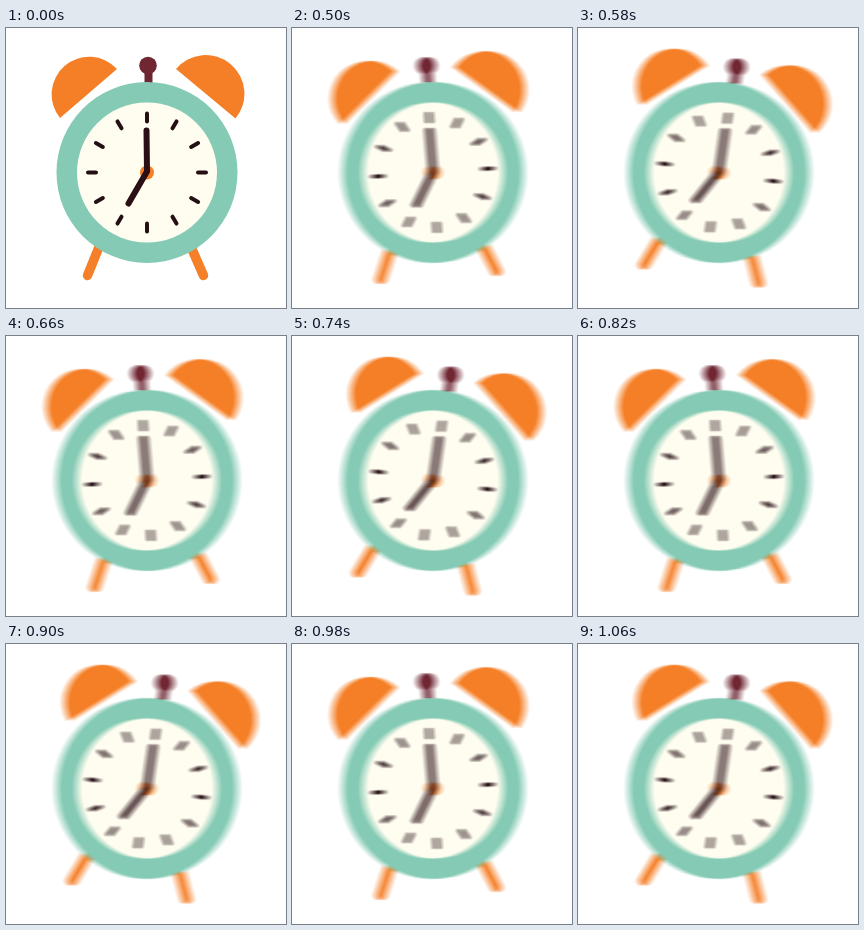
Animation, 280 px wide and 280 px high, one loop 1.14 s. Source, as an HTML page:

```html
<!DOCTYPE html>
<html lang="en">
<head>
<meta charset="utf-8">
<title>Ringing alarm clock</title>
<style>
  html, body { margin: 0; width: 100%; height: 100%; overflow: hidden; background: #fff; }
  svg { display: block; width: 100%; height: 100%; }

  .still, .ringing, .tilt { animation: 1140ms step-end infinite; }
  .still { animation-name: still; }
  .ringing { animation-name: ringing; }
  .tilt { animation-name: tilt; transform-origin: 141px 144.5px; }

  /* 500 ms at rest, then eight swings of 80 ms */
  @keyframes still { 0% { opacity: 1; } 43.859%, 100% { opacity: 0; } }
  @keyframes ringing { 0% { opacity: 0; } 43.859%, 100% { opacity: 1; } }
  @keyframes tilt {
    0%, 57.894%, 71.929%, 85.964% { transform: rotate(-4deg); }
    50.877%, 64.912%, 78.947%, 92.982%, 100% { transform: rotate(9deg); }
  }
</style>
</head>
<body>
<svg viewBox="0 0 280 280">
  <defs>
    <!-- sideways motion blur -->
    <filter id="smear" filterUnits="userSpaceOnUse" x="0" y="0" width="280" height="280"
            color-interpolation-filters="sRGB">
      <feConvolveMatrix order="11 1" kernelMatrix="1 1 1 1 1 1 1 1 1 1 1" divisor="11"
                        edgeMode="none" preserveAlpha="false"/>
    </filter>

    <path id="tick" d="M141 85.5V93.5"/>
    <g id="tickPair">
      <use href="#tick"/>
      <use href="#tick" transform="rotate(180 141 144.5)"/>
    </g>
    <g id="tickCross">
      <use href="#tickPair"/>
      <use href="#tickPair" transform="rotate(90 141 144.5)"/>
    </g>

    <g id="clock" stroke-linecap="round" stroke-linejoin="round">
      <g stroke="#f58029" stroke-width="9.5">
        <path d="M93 219L81.5 247.5"/>
        <path d="M185 219L197.5 247.5"/>
      </g>
      <g fill="#f57f26">
        <path d="M54 90A37.6 37.6 0 0 1 111 41Z"/>
        <path d="M170 41A38 38 0 0 1 229.5 90.5Z"/>
      </g>
      <path d="M142.5 40V58" stroke="#6c2633" stroke-width="8" stroke-linecap="butt"/>
      <circle cx="142" cy="37.5" r="8.8" fill="#702633"/>
      <circle cx="141" cy="144.5" r="90.5" fill="#84cab4"/>
      <circle cx="141" cy="144.5" r="70" fill="#fffdf0"/>
      <g stroke="#240f14" stroke-width="4">
        <use href="#tickCross"/>
        <use href="#tickCross" transform="rotate(30 141 144.5)"/>
        <use href="#tickCross" transform="rotate(60 141 144.5)"/>
      </g>
      <circle cx="141" cy="144.5" r="7" fill="#f57f26"/>
      <path d="M140.5 102.5L141 143.5L122.5 175.5" fill="none" stroke="#2a0f15" stroke-width="6"/>
    </g>
  </defs>

  <use class="still" href="#clock"/>
  <g class="ringing">
    <g filter="url(#smear)">
      <g class="tilt"><use href="#clock"/></g>
    </g>
  </g>
</svg>
</body>
</html>
```
